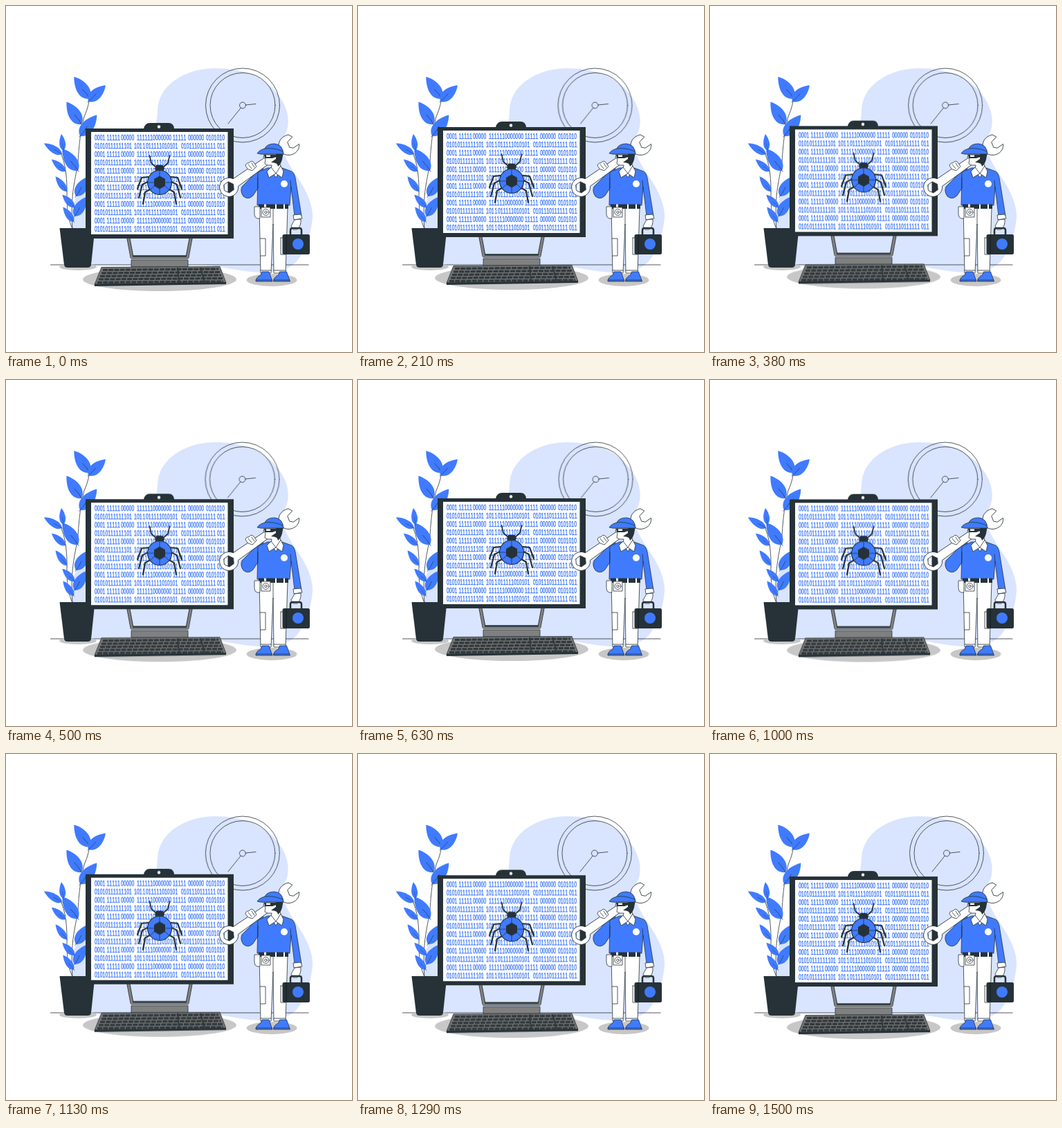
Write an HTML page without scripts that moves like this. It is 500 by 500 pixels and loops after 1540 ms.

```html
<!DOCTYPE html>
<html lang="en">
<head>
<meta charset="utf-8">
<title>Debugging</title>
<style>
html, body { margin: 0; width: 100%; height: 100%; overflow: hidden; background: #fff; }
svg { display: block; width: 100vw; height: 100vh; }
.line { fill: none; stroke: #263238; stroke-width: .8; stroke-linecap: round; stroke-linejoin: round; }
.blue { fill: #407bff; }
.dark { fill: #263238; }
.white { fill: #fff; }
.inked { stroke: #263238; stroke-width: .8; stroke-linejoin: round; }
.shadow { fill: #c7c7c7; }
.code {
  font: 11.2px "Liberation Sans", Arial, sans-serif;
  font-kerning: none;
  fill: #407bff;
  stroke: #407bff;
  stroke-width: .45;
}
#computer { animation: float 1540ms linear infinite; }
#clock { animation: shake 1540ms linear infinite; }
@keyframes float {
  0%, 96.5%, 100% { transform: translateY(0); }
  47.7% { transform: translateY(-7px); }
}
@keyframes shake {
  0%, 96.5%, 100% { transform: translateX(0); }
  8.8%, 86.7% { transform: translateX(-1px); }
  18.5%, 77% { transform: translateX(2px); }
  28.3%, 47.7%, 67.2% { transform: translateX(-4px); }
  38%, 57.5% { transform: translateX(4px); }
}
</style>
</head>
<body>
<svg viewBox="0 0 500 500">
  <defs>
    <g id="leaf">
      <path class="blue" d="M0 0C-13 -6 -12 -23 -1 -39C9 -27 13 -8 0 0Z"/>
      <path class="line" style="stroke-width:.6" d="M0 2Q1 -8 -1 -17"/>
    </g>
    <g id="rows" class="code">
      <text transform="translate(128 194.5) scale(.62 1)">0001<tspan x="28.2">11111</tspan><tspan x="61.3">00000</tspan><tspan x="98.4">1111110000000</tspan><tspan x="182.3">11111</tspan><tspan x="217.7">000000</tspan><tspan x="259.7">0101010</tspan></text>
      <text transform="translate(128 206.5) scale(.62 1)">01010111111101<tspan x="92">101</tspan><tspan x="112">1</tspan><tspan x="119.4">011111010101</tspan><tspan x="201.6">0101110111111</tspan><tspan x="285.5">011</tspan></text>
    </g>
    <g id="legs" class="line" style="stroke-width:2.2">
      <path style="stroke-width:1.7" d="M218 234L210 227L207.500 216"/>
      <path d="M206 247L196 248L190 264"/>
      <path d="M205 254L197 258L192 277"/>
      <path d="M208 265L201 269L198 286"/>
    </g>
    <g id="shoe">
      <path class="blue inked" d="M370 384H380L385 398H361Q361 392 368 389Z"/>
      <path class="line" d="M361 396H384"/>
    </g>
  </defs>

  <path fill="#d9e4ff" d="M219 150C221 112 262 90 302 90C345 90 378 103 398 135C408 151 412 172 402 188C394 203 404 220 416 240C430 260 444 283 443 305C441 330 434 350 421 368C410 381 390 385 368 385C330 384 300 371 262 374H127C100 360 88 320 99 282C110 246 135 235 165 218C200 200 218 190 219 150Z"/>

  <g id="clock" class="line">
    <circle cx="342" cy="143.500" r="53.500"/>
    <circle cx="342" cy="143.500" r="47"/>
    <circle cx="342" cy="143.500" r="4.500"/>
    <path d="M346.500 143L361 141.500M339.500 147L321 170"/>
  </g>

  <path class="line" d="M64.500 374H437"/>

  <g id="plant">
    <path class="line" d="M96 322C92 270 102 245 104 225C106 195 108 180 113 160Q121 142 121 127M96 322C84 295 90 270 87 245Q85 222 76 206"/>
    <use href="#leaf" transform="translate(121 134) rotate(-34)"/>
    <use href="#leaf" transform="translate(119 138) rotate(48) scale(.88)"/>
    <use href="#leaf" transform="translate(109 171) rotate(-32)"/>
    <use href="#leaf" transform="translate(107 188) rotate(40)"/>
    <use href="#leaf" transform="translate(104 238) rotate(-34)"/>
    <use href="#leaf" transform="translate(101 275) rotate(35) scale(.9)"/>
    <use href="#leaf" transform="translate(99 304) rotate(33) scale(.85)"/>
    <use href="#leaf" transform="translate(83 209) rotate(-6) scale(.5 .62)"/>
    <use href="#leaf" transform="translate(81 214) rotate(-58) scale(.6 .78)"/>
    <use href="#leaf" transform="translate(86 239) rotate(-48) scale(.55 .68)"/>
    <use href="#leaf" transform="translate(88 268) rotate(-36) scale(.55 .7)"/>
    <use href="#leaf" transform="translate(99 291) rotate(-43) scale(.55 .65)"/>
    <use href="#leaf" transform="translate(98 312) rotate(-35) scale(.55 .68)"/>
    <ellipse class="shadow" cx="104" cy="377" rx="27" ry="5"/>
    <path class="dark" d="M77.500 321H128.500L123 374Q122.500 378 118 378H89Q84.500 378 84 374Z"/>
  </g>

  <g id="computer">
    <ellipse class="shadow" cx="222" cy="395" rx="111" ry="17"/>
    <path class="line" style="stroke-width:5" d="M177 336L182 363H262L267 336"/>
    <path class="line" style="stroke:#808080;stroke-width:3.400" d="M177 336L182 364H262L267 336"/>
    <path class="line" style="stroke-width:2" d="M184 361.500H260"/>
    <path class="inked" fill="#808080" d="M181 367H263V377H181Z"/>
    <path class="dark" d="M115 177H199Q201 169 208 169H235Q242 169 243 177H329V336H115Z"/>
    <path class="white" d="M123 182H320.500V330H123Z"/>
    <circle class="white" cx="221" cy="174.500" r="2.200"/>
    <use href="#rows"/>
    <use href="#rows" y="23.900"/>
    <use href="#rows" y="47.800"/>
    <use href="#rows" y="71.700"/>
    <use href="#rows" y="95.600"/>
    <use href="#rows" y="119.500"/>

    <g id="bug">
      <use href="#legs"/>
      <use href="#legs" transform="matrix(-1 0 0 1 444 0)"/>
      <path class="dark" d="M217 230H227L229 235L226 240H218L215 235Z"/>
      <circle class="blue inked" style="stroke-width:1.200" cx="222" cy="255" r="17.500"/>
      <path class="line" d="M222 238V246M205 255H214M230 255H239M222 264V272M214 260L208 266M230 260L236 266"/>
      <path class="dark" d="M222 245.500L230 250V260L222 264.500L214 260V250Z"/>
    </g>

    <path class="inked" fill="#737373" d="M138 377.500L309 376.500L318 400L128 402.500Z"/>
    <path class="dark" d="M128 401.500L318 399V402L128 405Z"/>
    <g fill="none" stroke="#30383c" stroke-width="3.200" stroke-dasharray="7 1.200">
      <path d="M140 381.500L307 380M138 386L309 384.500M136 390.500L311 389M134 395L313 393.500M132 399.500L314 398"/>
    </g>
    <path fill="none" stroke="#30383c" stroke-width="2" d="M248 378L250 400M281 378L287 399"/>
  </g>

  <g id="worker">
    <ellipse class="shadow" cx="384" cy="396" rx="36.500" ry="9"/>

    <path class="white inked" d="M366 291H407L404 386H387L386 315L383 386H368Z"/>
    <path class="line" d="M386 293V316M367 336H375V361H368M397 335H404.500M397 335V359H404M368 382H383M387 382H404"/>
    <use href="#shoe"/>
    <use href="#shoe" x="25.500"/>

    <path class="blue inked" d="M372 234L362 240L341 261Q338 268 343 275Q350 281 357 274L365 262Z"/>
    <path class="blue inked" d="M378 234L364 240L363 288H410L412 262L417 303H427L418 248Q416 239 410 238L399 234Z"/>
    <path class="line" d="M411 252L412 264M364 248V264"/>
    <circle class="white" cx="402" cy="257" r="5"/>
    <path class="dark" d="M365 286.500H408V293H365Z"/>
    <path class="white" d="M373 286.500H376V293H373ZM389 286.500H391V293H389ZM401 286.500H403V293H401Z"/>
    <path class="white inked" d="M359 290H367V307H363Q359 306 359 301ZM369 291H382V305H369Z"/>
    <circle class="line" cx="375.500" cy="298" r="4.500"/>
    <circle class="line" cx="375.500" cy="298" r="1.800"/>

    <path class="white inked" fill-rule="evenodd" transform="translate(322 262) rotate(-35)" d="M12 -6.500L92 -5C95 -13 104 -17 114 -13L117 -7L107 -5L105 3L109 7L119 7C114 17 98 17 92 5L12 6.500A13.500 13.500 0 1 1 12 -6.500ZM8 0L4 -7H-4L-8 0L-4 7H4Z"/>

    <path class="white inked" d="M346 231Q347 226 351 227Q354 222 358 226L362 232L356 238L350 236Z"/>
    <path class="line" d="M350 229L355 235M355 227L359 233"/>

    <path class="white inked" d="M374 211L372 219L375 221L374 228Q377 231 384 230L383 237L390 248L398 235L395 225L398 212Z"/>
    <path class="dark" d="M390 211H401L399 222Q397 229 393 232Q393 226 383 226L390 221Z"/>
    <path class="white inked" d="M383 233L377 239L380 248L390 242L399 248L401 239L397 231L390 242Z"/>
    <path class="dark" d="M373 214.500H392V217.500L385 220H374Z"/>
    <path class="white" d="M376 215.500H382V218H376Z"/>
    <path class="blue inked" d="M363 213Q366 208 374 206Q377 199 388 199Q400 200 401 214H376Q369 215 363 213Z"/>
    <path class="line" d="M374 206Q385 204 400 210"/>

    <path class="white inked" d="M415 302L426 301L428 307L416 309Z"/>
    <path class="white inked" d="M417 309L426 308Q427 317 421 323H415L412 318Z"/>
    <path class="line" style="stroke-width:2.500" d="M411 331V324Q411 321 414 321H424Q427 321 427 324V331"/>
    <rect class="dark" x="399.500" y="330" width="39.500" height="29" rx="2.500"/>
    <path fill="none" stroke="#111a1f" stroke-width="1" d="M405 331V358"/>
    <circle class="blue" cx="422" cy="344" r="8"/>
  </g>
</svg>
</body>
</html>
```
